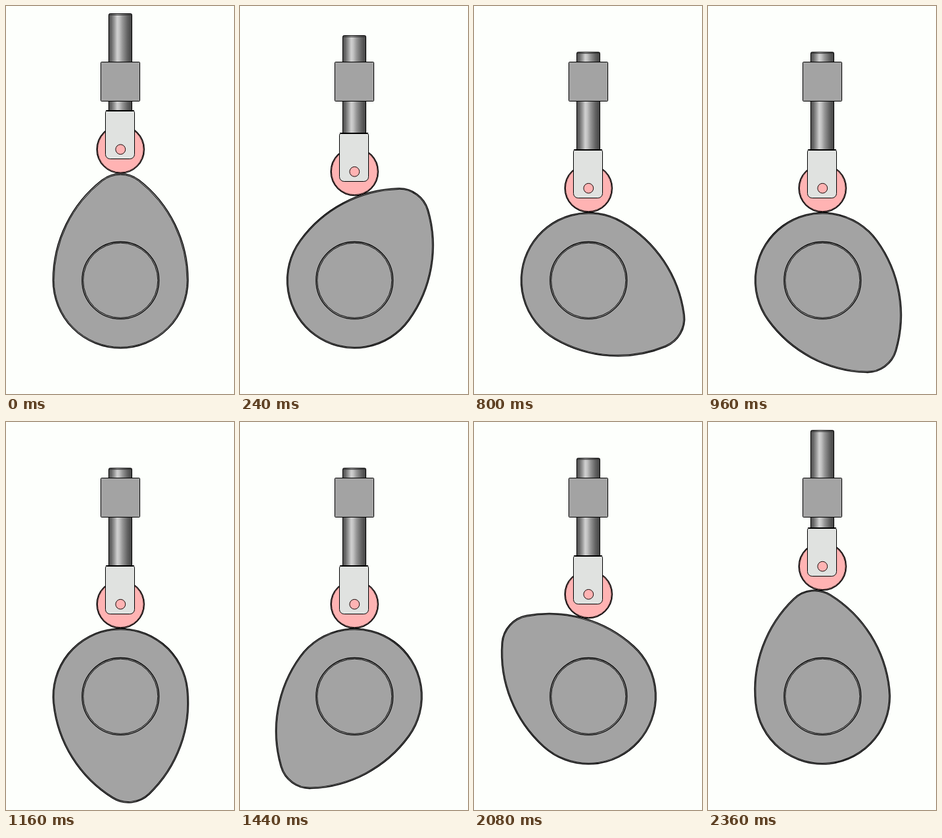
An HTML page with a canvas that plays this animation: 345x585 px, repeating every 2400 ms.

```html
<!DOCTYPE html>
<html lang="en">
<head>
<meta charset="utf-8">
<title>Cam and roller follower</title>
<style>
  html, body { margin: 0; width: 100%; height: 100%; overflow: hidden; background: #fdfffc; }
  canvas { display: block; }
</style>
</head>
<body>
<canvas id="stage" width="345" height="585"></canvas>
<script>
const ctx = document.getElementById('stage').getContext('2d');
const LOOP = 2400, STEP = 40;
const AXIS = { x: 173.3, y: 413.7 };
const BASE = 102.4, NOSE = 46, NOSE_DIST = 115, ROLLER = 36.5, HUB = 58.2;
const INK = '#000', GRAY = '#a3a3a3', PINK = '#ffb3b3';

// Flank arcs are tangent to both the base circle and the nose.
const gap = BASE - NOSE;
const FLANK_DIST = (NOSE_DIST ** 2 - gap ** 2) / (2 * gap);
const FLANK = BASE + FLANK_DIST;
const JOIN = Math.atan2(NOSE_DIST, FLANK_DIST);

const pitchNose = NOSE + ROLLER;
const noseLimit = Math.atan2(pitchNose * Math.cos(JOIN),
                             NOSE_DIST + pitchNose * Math.sin(JOIN));

// Distance from the cam axis to the roller centre.
function pitchRadius(angle) {
  const a = Math.abs(Math.atan2(Math.sin(angle), Math.cos(angle)));
  if (a >= Math.PI / 2) return BASE + ROLLER;
  const s = Math.sin(a);
  if (a <= noseLimit) {
    return NOSE_DIST * Math.cos(a) + Math.sqrt(pitchNose ** 2 - (NOSE_DIST * s) ** 2);
  }
  const p = FLANK_DIST * s;
  return Math.sqrt(p * p + (FLANK + ROLLER) ** 2 - FLANK_DIST ** 2) - p;
}

function paint(fill, stroke, width = 1) {
  if (fill) { ctx.fillStyle = fill; ctx.fill(); }
  if (stroke) { ctx.strokeStyle = stroke; ctx.lineWidth = width; ctx.stroke(); }
}

function circle(x, y, r, fill, stroke, width) {
  ctx.beginPath();
  ctx.arc(x, y, r, 0, Math.PI * 2);
  paint(fill, stroke, width);
}

function box(x, y, w, h, radii, fill, stroke) {
  ctx.beginPath();
  ctx.roundRect(x, y, w, h, radii);
  paint(fill, stroke);
}

function line(x1, x2, y, color) {
  ctx.beginPath();
  ctx.moveTo(x1, y);
  ctx.lineTo(x2, y);
  paint(null, color);
}

function camPath(inset) {
  const flank = FLANK - inset;
  ctx.beginPath();
  ctx.arc(-FLANK_DIST, 0, flank, 0, -JOIN, true);
  ctx.arc(0, -NOSE_DIST, NOSE - inset, -JOIN, JOIN - Math.PI, true);
  ctx.arc(FLANK_DIST, 0, flank, JOIN - Math.PI, -Math.PI, true);
  ctx.arc(0, 0, BASE - inset, Math.PI, 0, true);
  ctx.closePath();
}

function drawCam(angle) {
  ctx.save();
  ctx.translate(AXIS.x, AXIS.y);
  ctx.rotate(angle);
  camPath(0);
  paint(GRAY, INK, 1.3);
  camPath(1.7);
  paint(null, INK);
  ctx.restore();
  circle(AXIS.x, AXIS.y, HUB, null, INK, 1.3);
  circle(AXIS.x, AXIS.y, HUB - 1.7, null, INK);
}

const steel = ctx.createLinearGradient(155, 0, 191, 0);
[[0, '#4c4c4c'], [0.12, '#666'], [0.25, '#9a9a9a'], [0.37, '#d0d0d0'],
 [0.45, '#c4c4c4'], [0.6, '#949494'], [0.8, '#626262'], [1, '#404040']]
  .forEach(([at, color]) => steel.addColorStop(at, color));

function drawFollower(center) {
  const x = AXIS.x, y = Math.round(center);
  const top = Math.floor(center - 204.9) + 0.5;
  circle(x, center, 36, PINK, INK, 1.3);
  circle(x, center, 34.8, null, INK, 0.9);

  box(155.5, top, 35, y - 57.5 - top, [2, 2, 0, 0], steel, INK);
  line(156, 190, top + 2, '#2c2c2c');
  line(151, 194, y - 58.5, INK);

  box(150.5, y - 57.5, 44, 72, [2, 2, 7, 7], '#e0e2e0', INK);
  circle(x, center, 7.4, PINK, '#180808');

  box(143.5, 84.5, 59, 59, 1, GRAY, INK);
}

function render(now) {
  const step = Math.floor((now % LOOP) / STEP);
  const angle = step * STEP / LOOP * Math.PI * 2;
  ctx.fillStyle = '#fdfffc';
  ctx.fillRect(0, 0, 345, 585);
  drawCam(angle);
  drawFollower(AXIS.y - pitchRadius(angle));
}

let start;
function tick(now) {
  start ??= now;
  render(Math.max(0, now - start));
  requestAnimationFrame(tick);
}
render(0);
requestAnimationFrame(tick);
</script>
</body>
</html>
```
